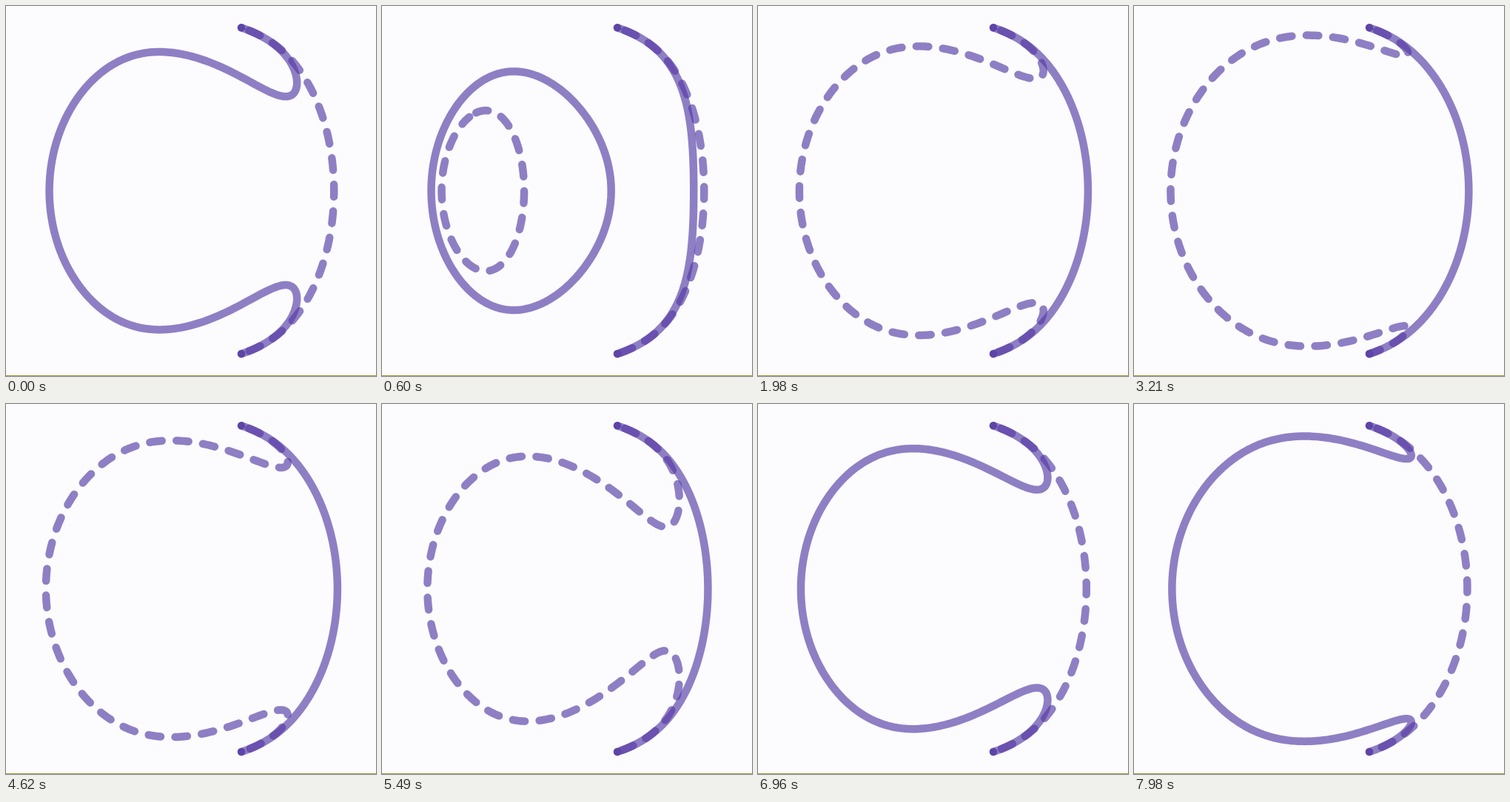
An HTML page with a canvas that plays this animation: 500x500 px, repeating every 8 s.

```html
<!DOCTYPE html>
<html>
<head>
<meta charset="utf-8">
<title>Elliptic curves</title>
<style>
html, body { margin: 0; width: 100%; height: 100%; overflow: hidden; background: #fcfcfe; }
canvas { display: block; width: 500px; height: 500px; }
</style>
</head>
<body>
<canvas id="stage" width="500" height="500"></canvas>
<script>
const SIZE = 500, LOOP = 8000, STEP = 30;
const CX = 250.9, CY = 249.7, RX = 225, RY = 231;
const P = -1.73, U_MAX = 10.38;
const LINE = 10.5, DASH = [16.5, 19.5], DASH_OFFSET = 25.25;
const OVAL_START = 0.61 * Math.PI;
const COLOR = '#8e7fc4', OVERLAP = '#6a51b0', TIP = '#5d44a6';

const stage = document.getElementById('stage').getContext('2d');
const layerCanvas = document.createElement('canvas');
layerCanvas.width = layerCanvas.height = SIZE;
const layer = layerCanvas.getContext('2d');

// Plane point lifted to a hemisphere; its rim is the line at infinity.
function project(u, v) {
  const r = Math.sqrt(1 + u * u + v * v);
  return [CX + RX * u / r, CY - RY * v / r];
}

// Real roots of u^3 + P u + q, largest first.
function roots(q) {
  const m = 2 * Math.sqrt(-P / 3);
  const c = 3 * q / (2 * P) * Math.sqrt(-3 / P);
  if (Math.abs(c) > 1) return [Math.sign(c) * m * Math.cosh(Math.acosh(Math.abs(c)) / 3)];
  const a = Math.acos(c) / 3;
  return [0, 2, 1].map(k => m * Math.cos(a - 2 * Math.PI * k / 3)).sort((x, y) => y - x);
}

// Constant term of the cubic, falling and rising at a steady rate.
function constantAt(ms) {
  return 1.95 * (Math.abs(ms / 1000 - 3.447) - 2.617);
}

// The curve v^2 = u^3 + P u + q: an open branch and sometimes an oval.
function curve(q) {
  const [top, mid, low] = roots(q);
  const path = new Path2D();
  const n = 300;
  for (let i = -n; i <= n; i++) {
    const w = -i / n;
    const u = top + (U_MAX - top) * w * w;
    const rest = u * u + top * u + top * top + P;
    const v = Math.sign(w) * Math.sqrt(Math.max(0, (u - top) * rest));
    path.lineTo(...project(u, v));
  }
  if (low !== undefined) {
    const half = (mid - low) / 2;
    for (let i = 0; i <= n; i++) {
      const a = OVAL_START - 2 * Math.PI * i / n;
      const u = (mid + low) / 2 + half * Math.cos(a);
      const point = project(u, half * Math.sin(a) * Math.sqrt(top - u));
      if (i) path.lineTo(...point);
      else path.moveTo(...point);
    }
  }
  return path;
}

function stroke(ctx, path, color, dashed) {
  ctx.lineWidth = LINE;
  ctx.lineCap = ctx.lineJoin = 'round';
  ctx.strokeStyle = color;
  ctx.setLineDash(dashed ? DASH : []);
  ctx.lineDashOffset = DASH_OFFSET;
  ctx.stroke(path);
}

function drawTips() {
  const v = Math.sqrt(U_MAX ** 3 + P * U_MAX);
  stage.fillStyle = TIP;
  for (const side of [-1, 1]) {
    stage.beginPath();
    stage.arc(...project(U_MAX, side * v), LINE / 2, 0, 2 * Math.PI);
    stage.fill();
  }
}

function draw(ms) {
  const q = constantAt(ms);
  const solid = curve(q), dashed = curve(-q);

  stage.fillStyle = '#fcfcfe';
  stage.fillRect(0, 0, SIZE, SIZE);
  stroke(stage, solid, COLOR, false);
  stroke(stage, dashed, COLOR, true);

  // Only the area shared by both strokes is darkened.
  layer.globalCompositeOperation = 'copy';
  stroke(layer, solid, COLOR, false);
  layer.globalCompositeOperation = 'source-in';
  stroke(layer, dashed, OVERLAP, true);
  stage.drawImage(layerCanvas, 0, 0);

  drawTips();
  stage.fillStyle = '#9c9c3c';
  stage.fillRect(0, 499, SIZE, 1);
}

const start = performance.now();
function tick() {
  const ms = (performance.now() - start) % LOOP;
  draw(Math.floor(ms / STEP) * STEP);
  requestAnimationFrame(tick);
}
tick();
</script>
</body>
</html>
```
